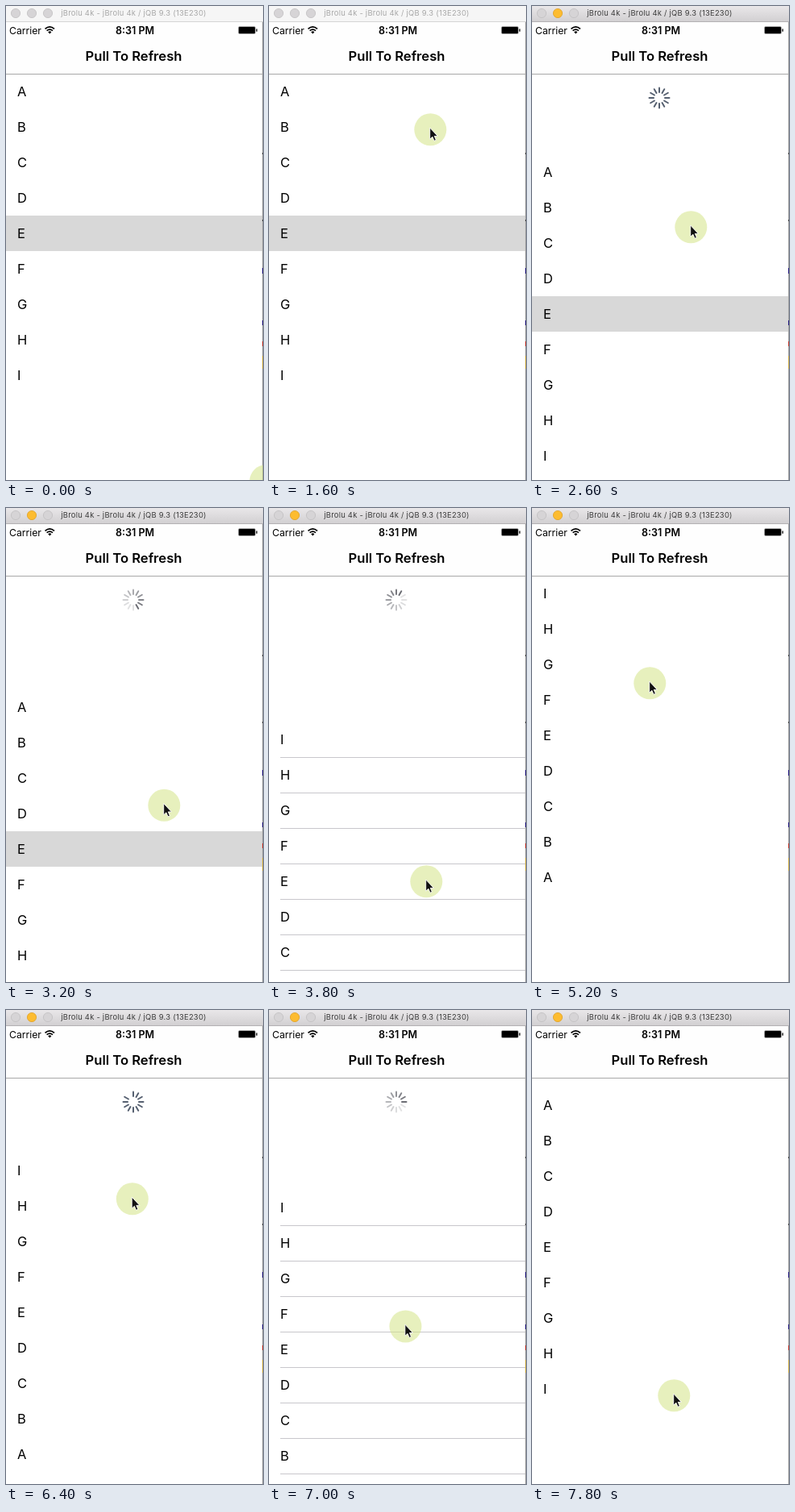
An HTML page that plays this animation: 319 px wide and 588 px high, repeating every 8 s.

```html
<!DOCTYPE html>
<html lang="en">
<head>
<meta charset="utf-8">
<title>Pull To Refresh</title>
<style>
  html, body { margin: 0; width: 100%; height: 100%; overflow: hidden; background: #fff; }
  svg { display: block; font-family: Inter, Roboto, sans-serif; }
  .middle { text-anchor: middle; }
  .bold { font-weight: 600; }
  .bar { fill: #f6f6f6; }
  .edge { fill: #d5d5d5; }
  .name { fill: #a8a8a8; font-size: 9.4px; letter-spacing: .25px; }
  .button { fill: #d6d4d6; stroke: #c1bfc1; stroke-width: .8; }
  .active .bar { fill: url(#chrome); }
  .active .edge { fill: #b3b1b3; }
  .active .name { fill: #3c3c3c; }
  .active .minimise { fill: #fdbc30; stroke: #dfa023; }
</style>
</head>
<body>
<svg width="319" height="588" viewBox="0 0 319 588">
  <defs>
    <linearGradient id="chrome" x2="0" y2="1">
      <stop stop-color="#e9e7e9"/><stop offset="1" stop-color="#d2d0d2"/>
    </linearGradient>
  </defs>
  <rect width="319" height="588" fill="#fff"/>

  <g id="spinner" transform="translate(158 114)" stroke-width="2" stroke-linecap="round"></g>

  <g id="list">
    <rect y="84" width="318" height="600" fill="#fff"/>
    <rect id="selected" y="260" width="318" height="44" fill="#d8d8d8"/>
    <g id="rows" font-size="16.5"></g>
    <g id="separators" fill="#c8c7cc"></g>
  </g>

  <g id="navigation">
    <rect y="20" width="318" height="64" fill="#fefefe"/>
    <rect y="84" width="318" height="1" fill="#a9a9a9"/>
    <text x="4" y="34.5" font-size="12.2">Carrier</text>
    <g fill="none" stroke="#000" stroke-width="1.7">
      <path d="M48.5 28.3Q54.3 23.3 60 28.3M50.6 30.7Q54.3 27.6 58 30.7"/>
      <path d="M52.2 32.2Q54.3 30.5 56.4 32.2L54.3 34.4Z" fill="#000" stroke="none"/>
    </g>
    <text x="160" y="34.5" font-size="12.5" class="middle bold">8:31 PM</text>
    <rect x="288.5" y="25.5" width="21" height="9" rx="1.5" fill="none" stroke="#000" stroke-opacity=".5" stroke-width=".7"/>
    <rect x="289" y="26" width="20" height="8" rx=".7"/>
    <rect x="310.5" y="28.3" width="1.3" height="3.5" rx=".6"/>
    <text x="158.5" y="68" font-size="16.6" class="middle bold">Pull To Refresh</text>
  </g>

  <g id="titlebar">
    <rect class="bar" width="319" height="19"/>
    <rect class="edge" y="19" width="319" height="1"/>
    <circle class="button" cx="12" cy="9" r="5.6"/>
    <circle class="button minimise" cx="32" cy="9" r="5.6"/>
    <circle class="button" cx="52" cy="9" r="5.6"/>
    <text class="name middle" x="158.5" y="12.3">jBrolu 4k - jBrolu 4k / jQB 9.3 (13E230)</text>
  </g>

  <g id="windowEdge">
    <rect x="318" y="20" width="1" height="568" fill="#a6a6a6"/>
    <path d="M318 182h1v2h-1zM318 265h1v2h-1z" fill="#444"/>
    <path d="M318 325h1v7h-1zM318 390h1v6h-1z" fill="#241a80"/>
    <path d="M318 416h1v6h-1z" fill="#c53b30"/>
    <path d="M318 434h1v16h-1z" fill="#d2b04a"/>
  </g>

  <g id="pointer">
    <circle cx=".3" cy=".3" r="20" fill="#d5e48a" fill-opacity=".56"/>
    <path d="M-.3-2V12.2L2.9 9.3L5 14.3L7.4 13.3L5.3 8.4H9.4Z" fill="#111" stroke="#fff" stroke-width=".9"/>
  </g>
</svg>

<script>
const LOOP = 8000, STEP = 200, ROW = 44, TOP = 84;
const LETTERS = [..."ABCDEFGHI"];
const SPOKES = 12;
const FIRST_RELOAD = 3400, SECOND_RELOAD = 7200;

const el = id => document.getElementById(id);
const show = (id, visible) => el(id).style.display = visible ? "" : "none";
const between = (time, from, to) => time >= from && time < to;

function add(parent, tag, attributes) {
  const node = document.createElementNS("http://www.w3.org/2000/svg", tag);
  for (const name in attributes) node.setAttribute(name, attributes[name]);
  return parent.appendChild(node);
}

// Eased progress from 0 to 1 between two times.
function glide(time, from, to) {
  const k = Math.min(1, Math.max(0, (time - from) / (to - from)));
  return k * k * (3 - 2 * k);
}

const labels = LETTERS.map((_, i) => {
  const top = TOP + i * ROW;
  add(el("separators"), "rect", { x: 14, y: top + ROW, width: 304, height: 1 });
  return add(el("rows"), "text", { x: 14, y: top + 27.5 });
});
const spokes = Array.from({ length: SPOKES }, (_, i) =>
  add(el("spinner"), "line", { y1: -7, y2: -12.5, transform: `rotate(${i * 360 / SPOKES})` }));

function drawList(time, pull) {
  const reversed = between(time, FIRST_RELOAD, SECOND_RELOAD);
  labels.forEach((label, i) => label.textContent = LETTERS.at(reversed ? -1 - i : i));
  el("list").setAttribute("transform", `translate(0 ${Math.floor(pull)})`);
  // Hairlines only survive the half-size display at half-point offsets.
  show("separators", pull % 1);
  show("selected", time < FIRST_RELOAD);
}

function drawSpinner(time, pull) {
  const spinning = between(time, 2800, 5200) || time >= 6600;
  const head = 1 + Math.floor((time - 3800) * SPOKES / 1000);
  const shown = (pull - 28) / 6;
  spokes.forEach((spoke, i) => {
    const age = (head - i + 10 * SPOKES) % SPOKES;
    spoke.setAttribute("stroke", spinning ? "#6c6d74" : "#566070");
    spoke.setAttribute("opacity", spinning ? Math.max(.2, 1 - age * .085) : +(i < shown));
  });
}

function draw(time) {
  const approach = glide(time, 400, 1200);
  const pull1 = glide(time, 1600, 2600), stretch1 = glide(time, 2600, 3800);
  const spring1 = glide(time, 4000, 4800), back = glide(time, 4200, 5200);
  const pull2 = glide(time, 5200, 6300), stretch2 = glide(time, 6400, 7400);
  const spring2 = glide(time, 7400, 7879);

  const x = 322 - 122 * approach - 3 * pull1 - 2 * stretch1 - 49 * back + 10.5 * pull2 + 19.5 * stretch2;
  const y = 589 - 436 * approach + 121 * pull1 + 189 * stretch1 - 246 * back
    + 17 * pull2 - 60 * Math.sin(Math.PI * pull2) + 244 * stretch2;
  el("pointer").setAttribute("transform", `translate(${x} ${y})`);

  const offset = 100 * pull1 + 81.5 * stretch1 - 181.5 * spring1
    + 93 * pull2 + 72 * stretch2 - 165 * spring2;
  const pull = Math.round(offset * 2) / 2;
  drawList(time, pull);
  drawSpinner(time, pull);
  el("titlebar").classList.toggle("active", time >= 1800);
}

const start = performance.now();
function tick() {
  const time = (performance.now() - start) % LOOP;
  draw(Math.floor(time / STEP) * STEP);
  requestAnimationFrame(tick);
}
tick();
</script>
</body>
</html>
```
